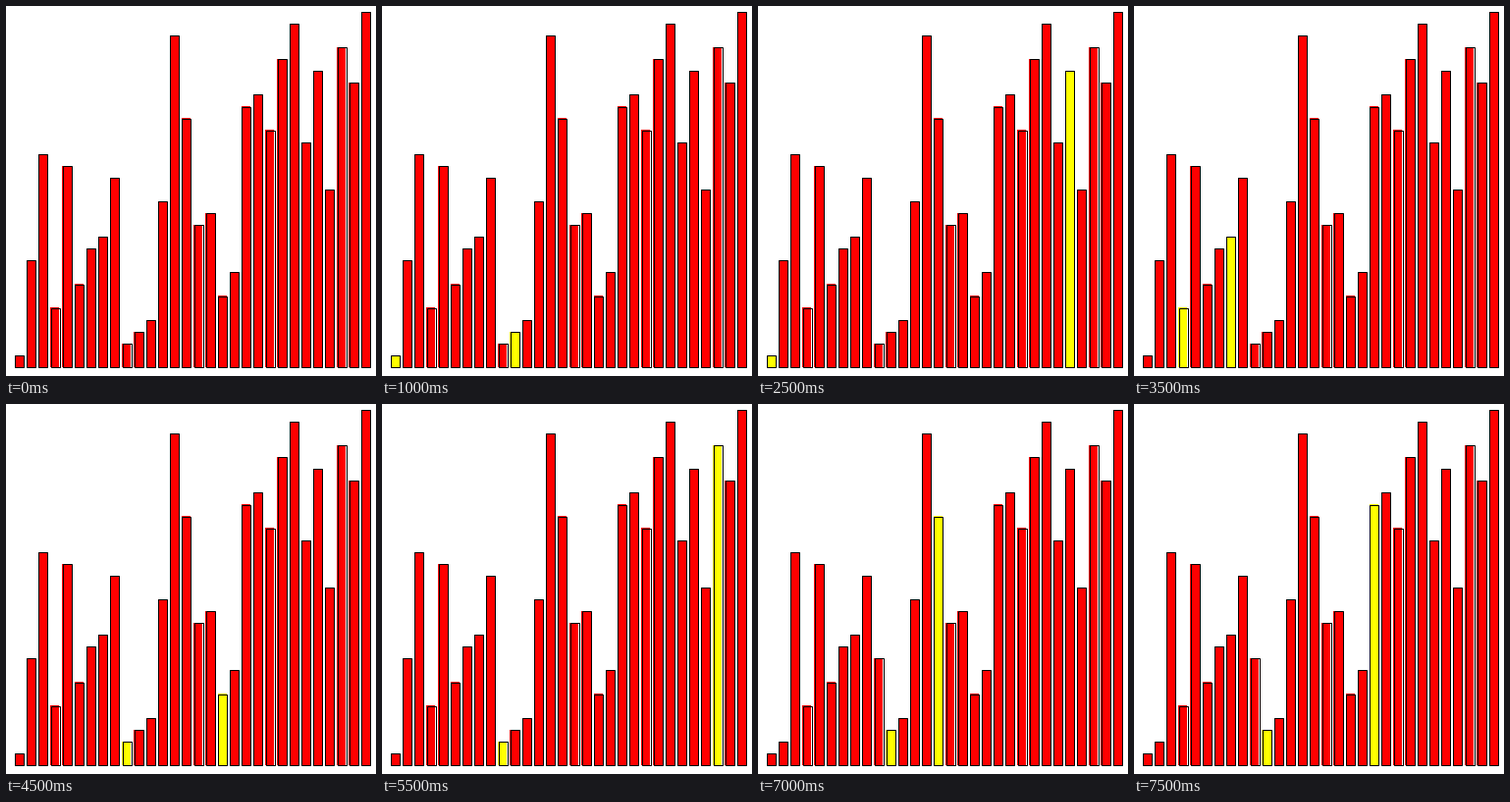
Recreate the animation shown at these times as a matplotlib script. Size 377 px wide and 377 px high, loop 8 s.

```python
from math import floor

import matplotlib.pyplot as plt
from matplotlib.animation import FuncAnimation
from matplotlib.patches import Rectangle

SIZE, DPI = 377, 100
FRAMES, INTERVAL, STRIDE = 16, 500, 5
BASE = 368
RED, YELLOW = "#ff0000", "#ffff00"
START = [1, 9, 18, 5, 17, 7, 10, 11, 16, 2, 3, 4, 14, 28, 21,
         12, 13, 6, 8, 22, 23, 20, 26, 29, 19, 25, 15, 27, 24, 30]


def selection_sort(values):
    """Yield (values, highlighted bars) for every comparison and swap."""
    a = list(values)
    yield a[:], ()
    for i in range(len(a) - 1):
        low = i
        for j in range(i + 1, len(a)):
            yield a[:], (low, j)
            if a[j] < a[low]:
                low = j
        if low != i:
            a[i], a[low] = a[low], a[i]
            yield a[:], (i, low)


STEPS = list(selection_sort(START))

fig = plt.figure(figsize=(SIZE / DPI, SIZE / DPI), dpi=DPI, facecolor="white")
ax = fig.add_axes([0, 0, 1, 1])
ax.set_xlim(0, SIZE)
ax.set_ylim(SIZE, 0)
ax.axis("off")


def add_rect(**style):
    # Bounds are already on the pixel grid, so snapping would shift them.
    return ax.add_patch(Rectangle((0, 0), 1, 1, snap=False, **style))


bars = [(add_rect(facecolor=RED, edgecolor="none", linewidth=0),
         add_rect(fill=False, edgecolor="black", linewidth=72 / DPI))
        for _ in START]


def place(i, value, color):
    """Fill and outline round to whole pixels slightly differently."""
    fill, edge = bars[i]
    x = 9 + 73 * i / 6
    y = BASE - 362 * value / 30

    left, top, right = floor(x + 0.3), floor(y + 0.3), floor(x + 9.45)
    fill.set_bounds(left, top, right - left, BASE - top)
    fill.set_facecolor(color)

    left, top, right = floor(x + 0.5), floor(y + 0.5), floor(x + 9.5)
    edge.set_bounds(left + 0.5, top + 0.5, right - left, BASE - top)


def draw(frame):
    values, active = STEPS[frame * STRIDE]
    for i, value in enumerate(values):
        place(i, value, YELLOW if i in active else RED)
    return [patch for bar in bars for patch in bar]


anim = FuncAnimation(fig, draw, frames=FRAMES, interval=INTERVAL,
                     repeat=True, repeat_delay=0, blit=False)
plt.show()
```
